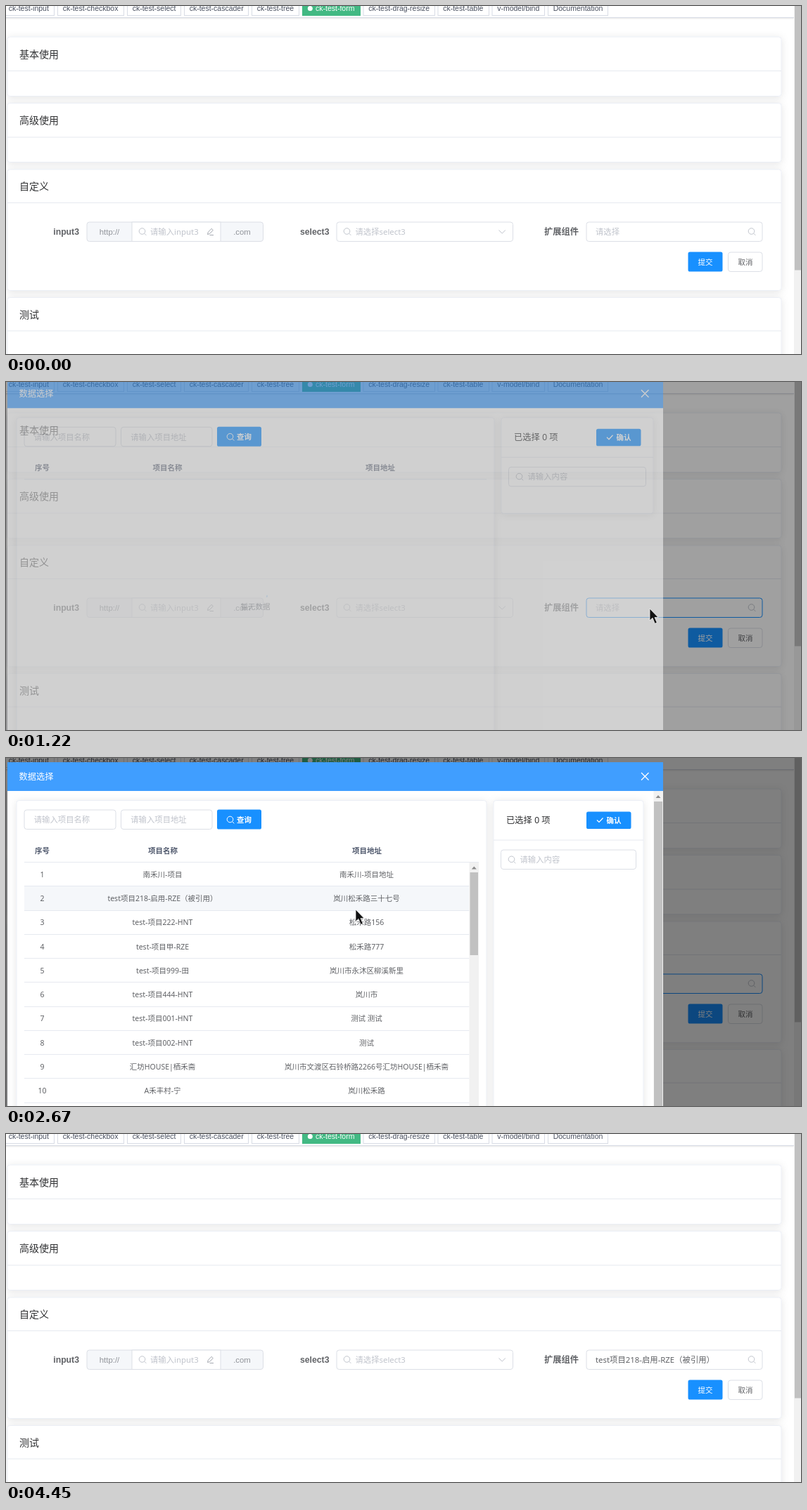
An HTML page that plays this animation: 1130 by 496 pixels, repeating every 5.39 s.

```html
<!DOCTYPE html>
<html lang="zh-CN">
<head>
<meta charset="utf-8">
<title>Form dialog demo</title>
<style>
html, body { margin: 0; width: 100%; height: 100%; overflow: hidden; background: #fff; }
svg { display: block; width: 1130px; height: 496px; }
text { font-family: 'Noto Sans', 'Noto Sans CJK SC', 'Noto Sans CJK', sans-serif; white-space: pre; }
.ar { font-family: 'Liberation Sans', 'Noto Sans CJK SC', 'Noto Sans CJK', sans-serif; }
.b { font-weight: bold; }
.m { text-anchor: middle; }
</style>
</head>
<body>
<svg id="stage" viewBox="0 0 1130 496" xmlns="http://www.w3.org/2000/svg"></svg>
<script>
const LOOP = 5390;
const BLUE = '#1890ff', LINE = '#e6e9f0', EDGE = '#dcdfe6', HINT = '#c0c4cc', TEXT = '#606266';
const PICK = 'test项目218-启用-RZE（';

// Drawing helpers
const rect = (x, y, x2, y2, fill, extra = '') =>
  `<rect x="${x}" y="${y}" width="${x2 - x}" height="${y2 - y}" fill="${fill}" ${extra}/>`;
const box = (x, y, x2, y2, stroke = EDGE, extra = '') =>
  rect(x, y, x2, y2, '#fff', `stroke="${stroke}" rx="3.5" ${extra}`);
const txt = (x, cy, s, size, fill, cls = '', extra = '') =>
  `<text x="${x}" y="${cy + size * 0.38}" font-size="${size}" fill="${fill}" class="${cls}" ${extra}>${s}</text>`;
const hline = (x, x2, y, c = LINE) => `<path d="M${x} ${y}H${x2}" stroke="${c}"/>`;
const stroke = (d, c, w = 1) => `<path d="${d}" fill="none" stroke="${c}" stroke-width="${w}"/>`;
const lens = (x, y, c = HINT) => `<circle cx="${x - 0.5}" cy="${y - 0.5}" r="4.3" fill="none" stroke="${c}"/>` +
  stroke(`M${x + 2.7} ${y + 2.7}l2.6 2.6`, c);
const shadowBox = (x, y, x2, y2) => box(x, y, x2, y2, '#ebeef5', 'filter="url(#sh)"');
const upArrow = (x, y) => `<path d="M${x - 3.5} ${y + 2}h7l-3.5-4z" fill="#8a8a8a"/>`;

function tabs() {
  const list = [['input', -4, 68], ['checkbox', 73, 167], ['select', 172, 248], ['cascader', 253, 344],
    ['tree', 349, 416], ['form', 421, 503], ['drag-resize', 507.5, 609], ['table', 613.5, 686],
    ['v-model/bind', 690.5, 765], ['Documentation', 770, 855]];
  return rect(-20, -20, 1120, 16.5, '#fff', 'filter="url(#bar)"') + hline(0, 1120, 16.5, '#d8dce5') +
    list.map(([name, x, x2], i) => {
      const on = name === 'form', label = i < 8 ? 'ck-test-' + name : name;
      return rect(x + 0.5, -10, x2 + 0.5, 13.5, on ? '#42b983' : '#fff', `stroke="${on ? '#42b983' : '#d8dce5'}"`) +
        (on ? '<circle cx="432.3" cy="3.5" r="3.5" fill="#fff"/>' : '') +
        txt(on ? 440 : x + 7.7, 3.4, label, 10.5, on ? '#fff' : '#495060', 'ar');
    }).join('');
}

function page() {
  const cards = [['基本使用', 44, 128.5, 92.5], ['高级使用', 138.5, 222.5, 187],
    ['自定义', 233, 405.5, 280.5], ['测试', 415.5, 560, 463]];
  return rect(0, 0, 1130, 496, '#fff') + tabs() +
    cards.map(([s, y, y2, mid]) => shadowBox(2, y, 1102, y2) + hline(2, 1102, mid) +
      txt(19, (y + mid) / 2, s, 14, '#303133')).join('') +
    txt(104, 321.5, 'input3', 12.25, TEXT, 'ar b', 'text-anchor="end"') +
    box(115, 308, 365.5, 335.5, EDGE, 'style="fill:#f5f7fa"') +
    rect(179, 308, 305, 335.5, '#fff', `stroke="${EDGE}"`) +
    txt(147, 321.5, 'http://', 11.375, '#909399', 'ar m') + txt(335.5, 321.5, '.com', 11.375, '#909399', 'ar m') +
    lens(194, 321.5) + txt(205, 321.5, '请输入input3', 11.375, HINT) +
    stroke('M286.500 325.500l.8-3.200 4.700-5 2.300 2.200-4.700 5zM289.500 326.500h5.500', '#a4a8b0') +
    txt(459.5, 321.5, 'select3', 12.25, TEXT, 'ar b', 'text-anchor="end"') +
    box(470, 308, 720.5, 335.5) + lens(485, 321.5) + txt(496.5, 321.5, '请选择select3', 11.375, HINT) +
    stroke('M700.500 319.500l4.700 4.500 4.700-4.500', HINT) +
    txt(765, 321.5, '扩展组件', 12.25, TEXT, 'b') +
    box(825, 308, 1075, 335.5, EDGE, 'id="field"') + txt(838, 321.5, '请选择', 11.375, HINT, '', 'id="value"') +
    lens(1060, 321.5) +
    rect(969.5, 350.5, 1018.5, 378.5, BLUE, 'rx="2.6"') + txt(994, 364.8, '提交', 10.5, '#fff', 'm') +
    box(1026.5, 351, 1075, 378.5) + txt(1051, 364.8, '取消', 10.5, TEXT, 'm') +
    rect(1120, 0, 1130, 496, '#f1f1f1') + rect(1121, 0, 1130, 376.5, '#c1c1c1');
}

// Right-hand panel of chosen items
function chosen(x, x2, bottom, id) {
  return shadowBox(x, 60.5, x2, bottom) + hline(x, x2, 117) +
    txt(x + 18, 88, '已选择 0 项', 12.25, '#303133', 'ar', `id="count${id}"`) +
    rect(x2 - 81, 76.5, x2 - 17.5, 101, BLUE, `rx="2.6" id="ok${id}"`) +
    stroke(`M${x2 - 66} 88.500l3 3 5.500-6`, '#fff', 1.2) + txt(x2 - 52.5, 88.8, '确认', 10.5, '#fff', 'b') +
    box(x + 10.5, 131, x2 - 10.5, 158.5) + lens(x + 26, 144.8) + txt(x + 37.5, 144.8, '请输入内容', 11.375, HINT);
}

const heads = (a, b, end) => [[51.5, '序号'], [a, '项目名称'], [b, '项目地址']]
  .map(([x, s]) => txt(x, 131.8, s, 10.5, '#515a6e', 'b m')).join('') + hline(26, end, 148.5);

const search = () => [[26, 156, '请输入项目名称'], [163.5, 293, '请输入项目地址']]
  .map(([x, x2, s]) => box(x, 74, x2, 101.5) + txt(x + 13.7, 88, s, 11.375, HINT)).join('') +
  rect(300, 73.5, 363, 101.5, BLUE, 'rx="2.6"') + lens(319, 88, '#fff') + txt(328, 88, '查询', 10.5, '#fff', 'b');

const ROW = 34.25;
function table() {
  const rows = [['南禾川-项目', '南禾川-项目地址'], [PICK + '被引用）', '岚川松禾路三十七号'],
    ['test-项目222-HNT', '松禾路156'], ['test-项目甲-RZE', '松禾路777'],
    ['test-项目999-田', '岚川市永沐区柳溪新里'], ['test-项目444-HNT', '岚川市'],
    ['test-项目001-HNT', '测试 测试'], ['test-项目002-HNT', '测试'],
    ['汇坊HOUSE|栖禾斋', '岚川市文渡区石铃桥路2266号汇坊HOUSE|栖禾斋'], ['A禾丰村-宁', '岚川松禾路']];
  return rect(26, 0, 658.5, ROW, '#f5f7fa', 'id="hover"') +
    rect(26, 148.5 + ROW, 658.5, 148.5 + 2 * ROW, '#e8f4ff', 'id="sel"') +
    rows.map((r, i) => {
      const cy = 165.8 + ROW * i;
      return txt(51.5, cy, i + 1, 10.5, TEXT, 'm') + txt(222.5, cy, r[0], 10.5, TEXT, 'm') +
        txt(512.5, cy, r[1], 10.5, TEXT, 'm') + hline(26, 658.5, Math.round(148 + ROW * (i + 1)) + 0.5);
    }).join('') +
    rect(658.5, 149, 672, 496, '#f1f1f1') + upArrow(665.3, 156.5) + rect(659.5, 163, 671, 281, '#c1c1c1');
}

function dialog() {
  return rect(2, 6, 934, 540, '#fff') + rect(2, 6, 934, 47, '#409eff') +
    txt(18.5, 26, '数据选择', 12.25, '#fff') + stroke('M903 21l10.500 10.500M913.500 21l-10.500 10.500', '#fff', 1.3) +
    '<g id="empty">' + shadowBox(15, 60.5, 694, 540) + search() + heads(229.5, 532, 683) +
    txt(354.5, 329.5, '暂无数据', 10.5, '#909399', 'm') + chosen(704, 920, 197.5, 0) + '</g>' +
    '<g id="full">' + shadowBox(15, 60.5, 683, 540) + search() + heads(223, 513, 672) + table() +
    chosen(693, 906, 540, 1) +
    '<g id="picked">' + txt(708, 187, PICK + '…', 12.25, TEXT) + hline(704, 896, 204.5) + '</g>' +
    rect(920.5, 47, 934, 496, '#f1f1f1') + upArrow(927, 55) + rect(921, 62, 933, 496, '#c1c1c1') + '</g>' +
    '<g id="mask">' + rect(26, 118, 682.5, 503, '#fff', 'opacity=".9"') +
    `<circle id="spin" r="16.8" fill="none" stroke="${BLUE}" stroke-width="1.700" stroke-linecap="round"/></g>`;
}

const SHAPES = {
  arrow: '<path d="M0 0V17l4-3.700 3.300 8 3-1.300-3.300-7.500H12z" fill="#111" stroke="#fff" stroke-width=".7"/>',
  beam: stroke('M-3-7.500H-1L0-6.500 1-7.500H3M0-6.500V6.500M-3 7.500H-1L0 6.500 1 7.500H3', '#111'),
  hand: '<path d="M-2 1.500Q-.5-.7 1 1.500V7l5 1.200q1.700.6 1.400 2.600L6 16H0L-4.500 10q-.3-2 2.500-.5z" fill="#fff" stroke="#111"/>'
};

const shadow = (id, dy, dev, a) => `<filter id="${id}" x="-10%" y="-40%" width="120%" height="180%">` +
  `<feDropShadow dx="0" dy="${dy}" stdDeviation="${dev}" flood-color="#000" flood-opacity="${a}"/></filter>`;
document.getElementById('stage').innerHTML =
  '<defs>' + shadow('sh', 1.75, 5.2, 0.1) + shadow('bar', 1, 1.3, 0.14) + '</defs>' +
  page() + rect(0, 0, 1130, 496, '#000', 'id="shade"') + '<g id="dlg">' + dialog() + '</g><g id="cursor">' +
  Object.entries(SHAPES).map(([k, s]) => `<g id="${k}">${s}</g>`).join('') + '</g>';

const ui = {};
document.querySelectorAll('#stage [id]').forEach(e => ui[e.id] = e);
const set = (id, name, v) => ui[id].setAttribute(name, v);
const show = (id, on) => set(id, 'display', on ? 'inline' : 'none');

// Timing
const clamp = v => Math.max(0, Math.min(1, v));
const bezier = (x1, y1, x2, y2) => x => {
  if (x <= 0 || x >= 1) return clamp(x);
  const at = (a, b, u) => 3 * a * u * (1 - u) ** 2 + 3 * b * u * u * (1 - u) + u ** 3;
  let lo = 0, hi = 1;
  for (let i = 0; i < 24; i++) {
    const u = (lo + hi) / 2;
    if (at(x1, x2, u) < x) lo = u; else hi = u;
  }
  return at(y1, y2, lo);
};
const ease = bezier(0.25, 0.1, 0.25, 1), inOut = bezier(0.42, 0, 0.58, 1);
const ramp = (t, start, len) => ease((t - start) / len);

const BURSTS = [[130, 620, 8], [890, 1360, 8], [1430, 1960, 9], [2030, 2530, 8],
  [2600, 2810, 4], [3020, 3500, 8], [3760, 4180, 7], [4310, 4450, 3]];
const TICKS = [0];
for (const [a, b, n] of BURSTS)
  for (let k = 0; k < n; k++) TICKS.push(Math.round((a + (b - a) * k / (n - 1)) / 10) * 10);
const snap = t => TICKS.filter(s => s <= t).pop();

const PATH = [[130, 1026, 464], [200, 1005, 432], [410, 935, 347], [620, 915, 324], [890, 915, 323],
  [1220, 915, 323], [1290, 910, 345], [1430, 860, 350], [1960, 600, 270], [2530, 497, 216], [2670, 497, 216],
  [2810, 488, 208], [3020, 488, 208], [3500, 864, 80], [3830, 865, 80], [4110, 1014, 262],
  [4180, 1047, 382], [4380, 1060, 452]];
function pointer(t) {
  const i = PATH.findIndex(p => p[0] > t);
  if (i <= 0) return PATH[i < 0 ? PATH.length - 1 : 0].slice(1);
  const [a, b] = [PATH[i - 1], PATH[i]], k = (t - a[0]) / (b[0] - a[0]);
  return [1, 2].map(j => a[j] + (b[j] - a[j]) * k);
}

function spinner(ms) {
  const s = Math.max(0, ms) / 1000, half = (s % 1.5) / 0.75;
  const a = inOut(Math.min(half, 1)), b = inOut(half - 1);
  const u = 0.84;
  set('spin', 'stroke-dasharray', `${(1 + 89 * a) * u} ${150 * u}`);
  set('spin', 'stroke-dashoffset', -(40 * a + 80 * b) * u);
  set('spin', 'transform', `translate(354.5 311.5) rotate(${s * 180})`);
}

function mix(k) {
  const from = [220, 223, 230], to = [24, 144, 255];
  return `rgb(${from.map((v, i) => Math.round(v + (to[i] - v) * k))})`;
}

function draw(t) {
  const [x, y] = pointer(t);
  const loaded = t >= 1960, picked = t >= 3020, done = t >= 3900;
  const vis = ramp(t, 1070, 300) * (1 - ramp(t, 3870, 300));

  set('shade', 'opacity', 0.5 * ramp(t, 1070, 200) * (1 - ramp(t, 3870, 200)));
  set('dlg', 'opacity', vis);
  set('dlg', 'transform', `translate(0 ${-20 * (1 - vis)})`);
  show('dlg', vis > 0);

  show('empty', !loaded);
  show('full', loaded);
  const mask = ramp(t, 1110, 300) * (1 - ramp(t, 2030, 300));
  set('mask', 'opacity', mask);
  show('mask', mask > 0);
  spinner(t - 1110);

  const row = Math.floor((y - 148.5) / ROW);
  show('hover', t >= 2030 && x < 658 && row >= 0);
  set('hover', 'y', 148.5 + row * ROW);
  show('sel', picked);
  show('picked', picked);
  ui.count1.textContent = `已选择 ${picked ? 1 : 0} 项`;

  const onOk = x > 825 && x < 888 && y > 76 && y < 101 && t > 3020 && !done;
  set('ok1', 'fill', onOk ? '#1682e6' : BLUE);
  set('field', 'stroke', mix(ramp(t, 860, 200) * (1 - ramp(t, 3000, 200))));
  ui.value.textContent = done ? PICK + '被引用）' : '请选择';
  set('value', 'fill', done ? TEXT : HINT);

  const hand = t > 3020 && t < 3900 && x > 825 && y < 101;
  const kind = hand ? 'hand' : t >= 550 && t < 1090 ? 'beam' : 'arrow';
  for (const k in SHAPES) show(k, k === kind);
  set('cursor', 'transform', `translate(${Math.round(x)} ${Math.round(y)})`);
  show('cursor', t >= 130 && t < 4450);
}

const begin = performance.now();
let last = -1;
function frame() {
  const t = snap((performance.now() - begin) % LOOP);
  if (t !== last) draw(last = t);
  requestAnimationFrame(frame);
}
frame();
</script>
</body>
</html>
```
